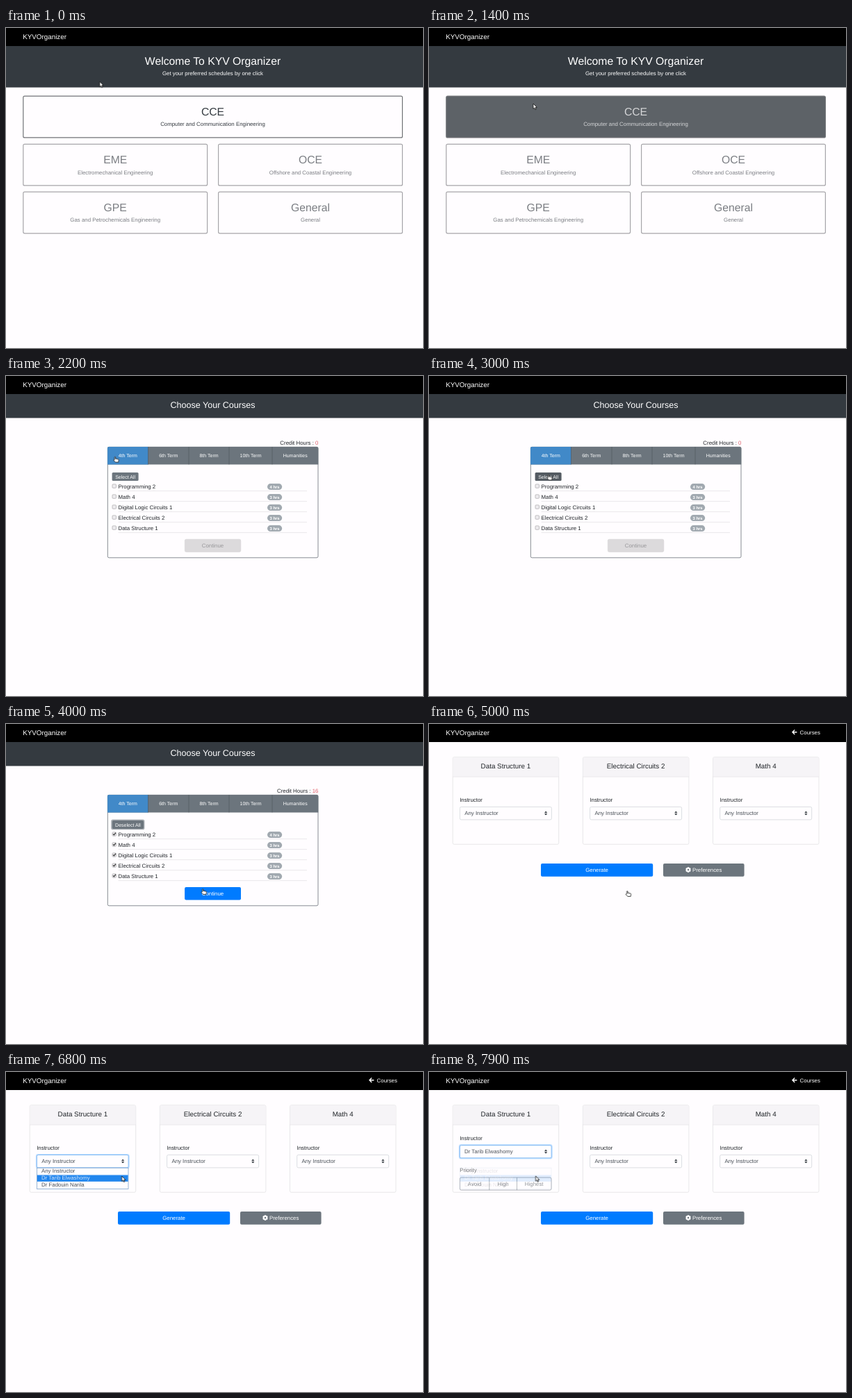
These frames come from a looping animation (600x461 px, 8000 ms). An HTML page:

```html
<!DOCTYPE html>
<html lang="en">
<head>
<meta charset="utf-8">
<title>Course planner</title>
<style>
html, body { margin: 0; width: 100%; height: 100%; overflow: hidden; background: #fffdff; }
svg { display: block; width: 100%; height: 100%; }
text { font: 7.87px "Liberation Sans", Arial, sans-serif; fill: #212529; text-rendering: geometricPrecision; }
.mid { text-anchor: middle; }
.end { text-anchor: end; }
.h2 { font-size: 15.74px; }
.h3 { font-size: 12.55px; }
.h5 { font-size: 9.84px; }
.sm { font-size: 7px; }
.badge { font-size: 5.9px; font-weight: bold; }
.white { fill: #fff; }
.ink { fill: #343a40; }
.gray { fill: #495057; }
.mute { fill: #98979a; }
.red { fill: #e0606b; }
.cur { fill: currentColor; }
.line { fill: none; }

/* Everything changes in hard steps on one 8 s clock. */
.a { animation: 8s step-end -10ms infinite; }
.off { opacity: 0; }

#home { animation-name: home; }
#courses { animation-name: courses; }
#plan { animation-name: plan; }
@keyframes home { 27.5% { opacity: 0 } }
@keyframes courses { 27.5% { opacity: 1 } 62.5% { opacity: 0 } }
@keyframes plan { 62.5% { opacity: 1 } }

#cce { color: #343a40; animation-name: cceText; }
#cceBox { fill: #fffdff; animation-name: cceFill; }
#cceRing { animation-name: cceRing; }
@keyframes cceText { 16.25% { color: #6a6e72 } 17.5% { color: #d5d6d8 } 18.75% { color: #fff } }
@keyframes cceFill { 16.25% { fill: #c3c4c7 } 17.5% { fill: #5d6267 } 18.75% { fill: #343a40 } }
@keyframes cceRing { 23.75% { opacity: 1 } }

#idle { animation-name: idle; }
#done { animation-name: done; }
#all { fill: #6c757d; animation-name: all; }
#none { fill: #545b62; animation-name: none-fill; }
#noneRing { animation-name: noneRing; }
#go { fill: #007bff; animation-name: go; }
#goRing { animation-name: goRing; }
@keyframes idle { 41.25% { opacity: 0 } }
@keyframes done { 41.25% { opacity: 1 } }
@keyframes all { 36.25% { fill: #60686f } 37.5% { fill: #545b62 } }
@keyframes none-fill { 43.75% { fill: #60686f } 45% { fill: #6c757d } }
@keyframes noneRing { 57.5% { opacity: .5 } 58.75% { opacity: 0 } }
@keyframes go { 51.25% { fill: #0072ec } 52.5% { fill: #0069d9 } 57.5% { fill: #0062cc } }
@keyframes goRing { 57.5% { opacity: .5 } 58.75% { opacity: 1 } }

#gen { fill: #007bff; animation-name: gen; }
#form { animation-name: form; }
#focus { animation-name: focus; }
#any { animation-name: any; }
#picked { animation-name: picked; }
#menu { animation-name: menu; }
#bar { animation-name: bar; }
.opt0 { fill: #fff; animation-name: opt0; }
.opt1 { fill: #495057; animation-name: opt1; }
#priority { animation-name: priority; }
@keyframes gen { 71.25% { fill: #006fe6 } 72.5% { fill: #0073ee } 73.75% { fill: #007bff } }
@keyframes form { 96.25% { transform: translateY(-13.9px) } }
@keyframes focus { 80% { opacity: .5 } 81.25% { opacity: 1 } }
@keyframes any { 96.25% { opacity: 0 } }
@keyframes picked { 96.25% { opacity: 1 } }
@keyframes menu {
  80% { opacity: .3 } 81.25% { opacity: .7 } 82.5% { opacity: 1 }
  96.25% { opacity: .7 } 97.5% { opacity: .4 } 98.75% { opacity: .14 }
}
@keyframes bar { 83.75% { transform: translateY(9.9px) } }
@keyframes opt0 { 83.75% { fill: #495057 } }
@keyframes opt1 { 83.75% { fill: #d3e5fa } }
@keyframes priority {
  96.25% { opacity: .1; transform: translateY(15px) }
  97.5% { opacity: .35; transform: translateY(7px) }
  98.75% { opacity: .68; transform: none }
}

#pointer { transform: translate(134.8px, 77.3px); animation-name: pointer; }
#arrow { animation-name: arrow; }
#hand { animation-name: hand; }
@keyframes pointer {
  13.75% { transform: translate(137px, 64px) }
  15% { transform: translate(141px, 78px) }
  16.25% { transform: translate(146px, 98px) }
  17.5% { transform: translate(150px, 109px) }
  18.75% { transform: translate(152.3px, 112.5px) }
  27.5% { transform: translate(152.3px, 112.5px); animation-timing-function: steps(9, jump-start) }
  38.75% { transform: translate(169.3px, 141.5px) }
  42.5% { transform: translate(169.3px, 141.5px); animation-timing-function: steps(7, jump-start) }
  51.25% { transform: translate(280.5px, 237px) }
  51.26% { transform: translate(282.6px, 240px) }
  70% { transform: translate(282.6px, 240px); animation-timing-function: steps(7, jump-start) }
  78.75% { transform: translate(166px, 135.5px) }
  80% { transform: translate(166px, 135.5px) }
  82.5% { transform: translate(166.3px, 140px) }
  83.75% { transform: translate(166.6px, 147px) }
  85% { transform: translate(166.6px, 150px) }
  96.25% { transform: translate(165px, 150px) }
  97.5% { transform: translate(159px, 150px) }
  98.75% { transform: translate(153.5px, 149.8px) }
}
@keyframes arrow {
  27.5% { opacity: 0 } 32.5% { opacity: 1 } 36.25% { opacity: 0 } 43.75% { opacity: 1 }
  50% { opacity: 0 } 70% { opacity: 1 } 71.25% { opacity: 0 } 72.5% { opacity: 1 }
}
@keyframes hand {
  27.5% { opacity: 1 } 32.5% { opacity: 0 } 36.25% { opacity: 1 } 43.75% { opacity: 0 }
  50% { opacity: 1 } 70% { opacity: 0 } 71.25% { opacity: 1 } 72.5% { opacity: 0 }
}
</style>
</head>
<body>
<svg id="stage" viewBox="0 0 600 461"></svg>
<script>
const text = (x, y, str, cls = "") => `<text x="${x}" y="${y}" class="${cls}">${str}</text>`;
const box = (x, y, x2, y2, attrs = "", r = 0) =>
  `<rect x="${x}" y="${y}" width="${x2 - x}" height="${y2 - y}" rx="${r}" ${attrs}/>`;
const line = (d, color, w = 0.6) => `<path d="${d}" class="line" stroke="${color}" stroke-width="${w}"/>`;
const group = (id, body, cls = "a") => `<g id="${id}" class="${cls}">${body}</g>`;

// Home: faculty programmes
const program = (x, x2, y, name, full) => {
  const c = (x + x2) / 2;
  return `<g opacity=".65">${box(x, y, x2, y + 59.6, 'class="line" stroke="#77777b" stroke-width="1.2"', 2)}
    ${text(c, y + 27.8, name, "mid h2 ink")}${text(c, y + 43.2, full, "mid ink")}</g>`;
};

const home = box(0, 26, 600, 85.6, 'fill="#343a40"')
  + text(297.5, 53, "Welcome To KYV Organizer", "mid h2 white")
  + text(297.5, 68, "Get your preferred schedules by one click", "mid white")
  + box(23.7, 97, 571.4, 159, 'id="cceRing" class="line a off" stroke="#98979c" stroke-width="1.7"', 2.5)
  + group("cce", box(24.8, 98.1, 570.4, 157.9, 'id="cceBox" class="a" stroke="#717377" stroke-width="1.2"', 2)
    + text(297.5, 126, "CCE", "mid h2 cur")
    + text(297.5, 141.3, "Computer and Communication Engineering", "mid cur"))
  + program(24.8, 289.6, 167.3, "EME", "Electromechanical Engineering")
  + program(305.6, 570.4, 167.3, "OCE", "Offshore and Coastal Engineering")
  + program(24.8, 289.6, 236.2, "GPE", "Gas and Petrochemicals Engineering")
  + program(305.6, 570.4, 236.2, "General", "General");

// Course picker
const tabEdges = [146, 204.5, 263, 321, 383, 449.3];
const tabs = ["4th Term", "6th Term", "8th Term", "10th Term", "Humanities"].map((name, i) =>
  (i ? line(`M${tabEdges[i]} 102V127.5`, "#50575d") : "")
  + text((tabEdges[i] + tabEdges[i + 1]) / 2, 117.3, name, "mid sm white")).join("");

const rowY = i => 159.4 + i * 15;
const rows = ["Programming 2", "Math 4", "Digital Logic Circuits 1", "Electrical Circuits 2", "Data Structure 1"]
  .map((name, i) => {
    const y = rowY(i);
    return box(153, y - 3.5, 158.4, y + 1.9, 'fill="#eeecef" stroke="#a9a8ab" stroke-width=".7"', 1)
      + text(161.5, y + 2.7, name)
      + box(376, y - 4.3, 397.2, y + 4.7, 'fill="#a1a9b0"', 4.5)
      + text(386.6, y + 2.3, i ? "3 hrs" : "4 hrs", "mid badge white")
      + line(`M161.5 ${y + 6.2}H433`, "#dcdbde");
  }).join("");
const checks = [0, 1, 2, 3, 4].map(i =>
  line(`M154 ${rowY(i) - 1}l1.4 1.5 2.5-3.3`, "#333", 1.2)).join("");
const credit = n => `<text x="449.4" y="98.6" class="end">Credit Hours : <tspan class="red">${n}</tspan></text>`;

const courses = box(0, 26, 600, 60.5, 'fill="#343a40"')
  + text(297.5, 45.8, "Choose Your Courses", "mid h3 white")
  + box(146.3, 102.3, 449, 261.8, 'fill="#fffdff" stroke="#7a8187" stroke-width=".9"', 2)
  + `<path d="M146 127.6V104Q146 102 148 102H447.3Q449.3 102 449.3 104V127.6Z" fill="#6c757d"/>`
  + `<path d="M146 127.6V104Q146 102 148 102H204.5V127.6Z" fill="#4189c8"/>`
  + tabs + rows
  + group("idle", credit(0)
    + box(152.6, 139, 190.6, 151, 'id="all" class="a"', 1.6)
    + text(171.6, 147.5, "Select All", "mid sm white")
    + box(257.3, 235.2, 337.8, 253.4, 'fill="#dcdadc" stroke="#d0ced0" stroke-width=".5"', 2)
    + text(297.5, 246.8, "Continue", "mid mute"))
  + group("done", credit(16) + checks
    + box(152, 138.4, 198.6, 151.4, 'id="noneRing" class="line a" stroke="#a9aeb3" stroke-width="1.7"', 2)
    + box(152.7, 139, 198, 150.9, 'id="none" class="a"', 1.6)
    + text(175.4, 147.5, "Deselect All", "mid sm white")
    + box(256.7, 234.6, 338.4, 254.1, 'id="goRing" class="line a off" stroke="#86bfff" stroke-width="1.7"', 2.5)
    + box(257.1, 235, 338, 253.6, 'id="go" class="a"', 2)
    + text(297.5, 246.8, "Continue", "mid white"), "a off");

// Instructor planner
const frame = (x, title) => box(x, 47.8, x + 152.5, 173.3, 'fill="#fffdff" stroke="#dfdee0" stroke-width=".7"', 2)
  + box(x + .3, 48.1, x + 152.2, 76, 'fill="#f6f4f7"', 1.6)
  + line(`M${x} 76.1H${x + 152.5}`, "#dfdee0")
  + text(x + 76.2, 63.6, title, "mid h5");
const field = (x, value, focus = "") => text(x + 10, 112, "Instructor")
  + box(x + 10.2, 119.4, x + 142.2, 137.9, 'fill="#fffdff" stroke="#ccd1d6" stroke-width=".7"', 2)
  + focus + value
  + `<path d="M${x + 131.8} 127.9l2.1-2.5 2.1 2.5zm0 1.2l2.1 2.5 2.1-2.5z" fill="#343a40"/>`;
const anyone = x => text(x + 17, 131.2, "Any Instructor", "gray");

const focus = group("focus",
  box(43.6, 118.8, 176.9, 138.5, 'class="line" stroke="#bfdeff" stroke-width="1.6"', 2.6)
  + box(44.4, 119.5, 176.1, 137.8, 'class="line" stroke="#75b4f5" stroke-width=".8"', 2), "a off");
const form = group("form", field(34.2,
  group("any", anyone(34.2)) + group("picked", text(51, 131.2, "Dr Tarib Elwashomy", "gray"), "a off"), focus));

const menu = group("menu",
  box(44.4, 138.2, 176, 168.4, 'fill="#fffdff" stroke="#7da3cc" stroke-width=".8"')
  + box(44.8, 138.5, 175.6, 147.9, 'id="bar" class="a" fill="#2186ee"')
  + text(51, 145.3, "Any Instructor", "a opt0")
  + text(51, 155.2, "Dr Tarib Elwashomy", "a opt1")
  + text(51, 165, "Dr Fadouin Narila", "gray"), "a off");

const priority = group("priority", text(44.2, 144.2, "Priority")
  + box(44.4, 152, 176, 170.1, 'class="line" stroke="#6c757d" stroke-width=".8"', 2)
  + line("M86.8 152V170.1M126.5 152V170.1", "#6c757d", 0.8)
  + text(65.6, 163.6, "Avoid", "mid gray")
  + text(106.6, 163.6, "High", "mid gray")
  + text(151.2, 163.6, "Highest", "mid gray"), "a off");

const teeth = [0, 60, 120].map(r =>
  `<rect x="371.8" y="206.2" width="2.4" height="7.6" fill="#fff" transform="rotate(${r} 373 210)"/>`).join("");

const plan = box(0, 26, 600, 461, 'fill="#fffdff"')
  + line("M529.4 11.8H523.2M526.2 8.6L523 11.8L526.2 15", "#fff", 1.4)
  + text(533.6, 14.9, "Courses", "white")
  + frame(34.2, "Data Structure 1") + form + priority + menu
  + [[221.4, "Electrical Circuits 2"], [408.5, "Math 4"]].map(([x, title]) =>
    frame(x, title) + field(x, anyone(x))).join("")
  + box(161, 201, 322.2, 219.7, 'id="gen" class="a"', 2)
  + text(241.6, 212.9, "Generate", "mid white")
  + box(337, 201, 453.6, 219.7, 'fill="#6c757d"', 2)
  + teeth + `<circle cx="373" cy="210" r="2.1" fill="none" stroke="#fff" stroke-width="1.7"/>`
  + `<circle cx="373" cy="210" r="1.2" fill="#6c757d"/>`
  + text(379, 212.9, "Preferences", "white");

const shape = 'fill="#fff" stroke="#111" stroke-width=".8" stroke-linejoin="round"';
const pointer = group("pointer",
  `<path id="arrow" class="a" ${shape} d="M0 0V7.4L1.7 5.9L2.9 8.6L4.2 8L3 5.4H5.3Z"/>
   <path id="hand" class="a off" ${shape} d="M2 4.9V1Q2.7 0 3.4 1V3.4L7.2 4.1Q8.2 4.4 8 5.6L7.5 8.4H3.2L.5 5.6Q.6 4.4 2 4.9Z"/>`);

document.getElementById("stage").innerHTML = box(0, 0, 600, 461, 'fill="#fffdff"')
  + box(0, 0, 600, 26, 'fill="#000"')
  + group("home", home) + group("courses", courses, "a off") + group("plan", plan, "a off")
  + text(24.2, 15.9, "KYVOrganizer", "h5 white") + pointer;
</script>
</body>
</html>
```
